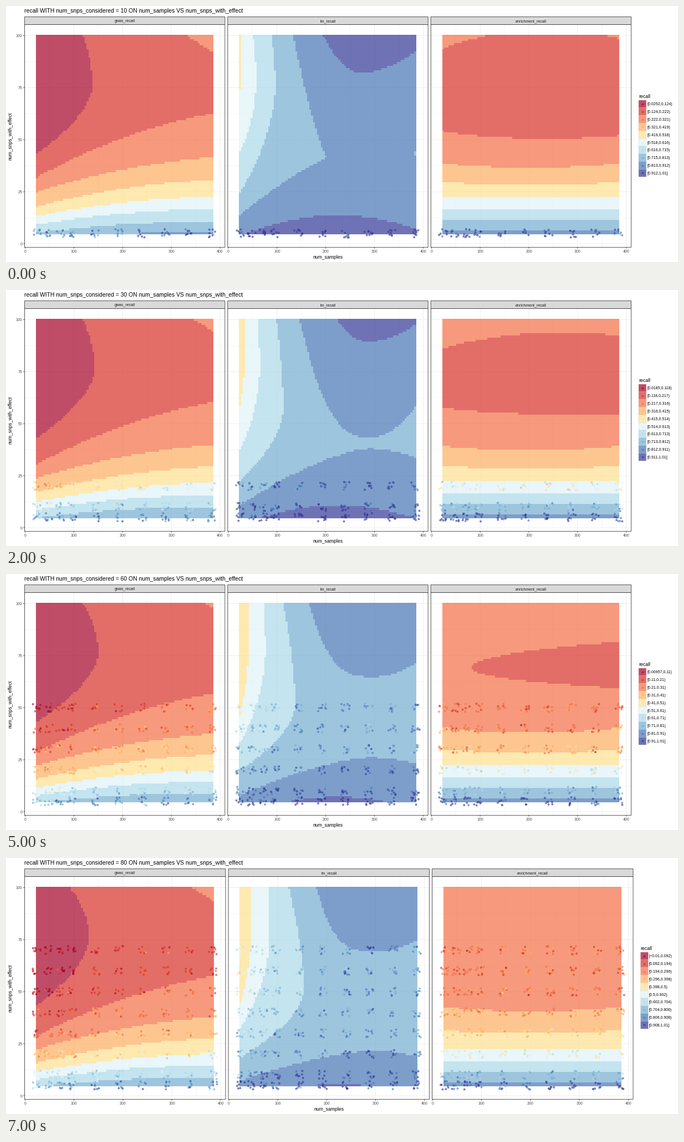
Write a matplotlib script that moves like this. It is 1212 px wide and 462 px high and loops after 8000 ms.

```python
import numpy as np
import matplotlib.pyplot as plt
from matplotlib.animation import FuncAnimation
from matplotlib.colors import to_rgb
from matplotlib.patches import Rectangle

W, H = 1212, 462
plt.rcParams["font.family"] = "Liberation Sans"

PALETTE = np.array([to_rgb(c) for c in (
    "#a50026", "#d73027", "#f46d43", "#fdae61", "#fee090",
    "#e0f3f8", "#abd9e9", "#74add1", "#4575b4", "#313695")])
PANELS = ("gwas_recall", "lm_recall", "enrichment_recall")
POINT_SHIFT = (0.2, 0.6, -0.2)
LOWEST = (0.0252, 0.0219, 0.0185, 0.0154, 0.0124, 0.00957, 0.00684, -0.01)
RIGHT_EDGE = {70: 1123.5, 80: 1131}
LEFT, TOP, BOTTOM, GAP = 33.5, 33.5, 435.5, 5
BASE, SMALL, TITLE = 8.67, 6.95, 10.4
INK, GREY, EDGE = "#000000", "#4d4d4d", "#333333"

GROUPS = [24, 48, 72] + list(range(96, 385, 48))
REPEATS = 8

# Tile centres, and the sample axis scaled to 0..1.
X, Y = np.meshgrid(np.arange(24, 385, 4), np.arange(5, 101))
S = (X - 24) / 360
HUMP = 4 * S * (1 - S)


def lobe(v, start, top, end, p, q=2):
    """Curve through three (position, value) points that is flat at the middle one."""
    d = v - top[0]
    before = d < 0
    reach = np.where(before, d / (start[0] - top[0]), d / (end[0] - top[0]))
    goal = np.where(before, start[1], end[1])
    return top[1] + (goal - top[1]) * reach ** np.where(before, p, q)


def gwas_field(num):
    t, late = min((num - 10) / 60, 1), max((num - 70) / 10, 0)
    field = np.full(X.shape, 1)

    width = 138 + 14 * t - 21 * late
    field[X < lobe(Y, (43, 22), (76, width), (101, 117 - 28 * late), 1.7)] = 0

    corner = 329 + 45 * t - 36 * late
    drop = 8.5 - 7.2 * t + 5.5 * late
    field[Y > 100.5 - drop * (X - corner) / (386 - corner)] = 2

    left = (32, 25, 18, 13.2, 9.2, 5.2, 2)
    right = (62.7, 41.5, 30.6, 22.5, 16.5, 10.5, 5.4)
    bends = np.linspace(0.5, 1.2, 7)
    for level, (a, b, bend) in enumerate(zip(left, right, bends), 2):
        height = a + (b - a) * (S + bend * S * (1 - S))
        field[Y < height * (1 - 0.1 * t + 0.03 * late) - 0.8 * t] = level
    return field


def lm_field(num):
    t = (num - 10) / 70
    rest = 1 - t
    field = np.full(X.shape, 7)

    low = 69.5 - 49.5 * rest**1.9
    upper = lobe(X, (133 + 45 * t, 101), (288 + 15 * t, low),
                 (390, 75.5 - 27.5 * rest**1.75), 2.3 + 1.2 * t)
    crest = 21.5 + 26.5 * rest**1.4
    lower = lobe(X, (20, 7 + 6 * rest**2), (290, crest), (390, 0.87 * crest), 1.5)
    field[(Y > upper) | (Y < lower)] = 8

    mid, low = 272 + 40 * t, 82.5 + 25 * t
    field[Y > lobe(X, (mid - 100, low + 30), (mid, low), (mid + 100, low + 8), 2)] = 9
    crest = 5.5 + 8.1 * rest**1.25
    field[Y < lobe(X, (45, crest - 8), (225, crest), (385, crest - 6.5), 2)] = 9

    field[X < lobe(Y, (23.7 - 5.5 * t, 22), (52 + 25 * rest**4, 97 + 57 * t),
                   (101, 89 + 33 * t), 1.85, 1.6)] = 6
    field[X < lobe(Y, (32 + 11 * rest**3, 22), (78, 57 + 27 * t),
                   (101, 51 + 30 * t), 2)] = 5
    peak = 26 + 22 * t**0.7
    field[X < lobe(Y, (43 + 25 * rest**2, 22), (101, peak), (102, peak), 3)] = 4
    return field


def enrichment_field(num):
    t, late = min((num - 10) / 60, 1), max((num - 70) / 10, 0)
    field = np.full(X.shape, 2)

    # The red lens shrinks to the right and vanishes.
    centre = 74 - 6 * t + 1.5 * S + 2 * (1 - t) * HUMP
    reach = (400 - 620 * t + 130 * t**2 - 100 * late
             + 150 * S + 200 * (1 - t)**2 * HUMP)
    field[(Y - centre)**2 < reach] = 1

    heights = (38.6 + 2 * t + 2 * late - 2 * HUMP,
               29.4 + 0.2 * t + 1.7 * late - HUMP, 22.4, 16.4, 11.4, 6.4)
    for level, height in enumerate(heights, 3):
        field[Y < height] = level
    return field


FIELDS = (gwas_field, lm_field, enrichment_field)


def y_px(v):
    return 429 - 3.755 * v


def text(x, y, s, size=SMALL, color=INK, **kw):
    ax.text(x, y, s, fontsize=size, color=color, va="baseline", **kw)


def line(xs, ys, color, width, z):
    ax.plot(xs, ys, color=color, lw=width, zorder=z,
            solid_capstyle="butt", snap=False)


def box(x, y, w, h, face, edge, width, z):
    ax.add_patch(Rectangle((x, y), w, h, fc=face, ec=edge, lw=width,
                           zorder=z, snap=False))


def dots(x, y, levels):
    rgb = PALETTE[levels]
    n = len(rgb)
    ax.scatter(x, y, s=8, lw=0.85, zorder=4,
               facecolors=np.column_stack([rgb, np.full(n, 0.4)]),
               edgecolors=np.column_stack([rgb, np.full(n, 0.8)]))


def draw_points(num, field, shift, x_px, rng):
    xs, ys, levels = [], [], []
    for row in [5] + list(range(10, num, 10)):
        for group in GROUPS:
            level = field[row - 5, (group - 24) // 4] + (0.8 if row == 5 else shift)
            xs += list(group + rng.uniform(-8.5, 8.5, REPEATS))
            ys += list(row + rng.uniform(-2, 2, REPEATS))
            levels += list(rng.normal(level, 0.65, REPEATS))
    levels = np.clip(np.rint(levels), 0, 9).astype(int)
    dots(x_px(np.array(xs)), y_px(np.array(ys)), levels)


def draw_panel(num, k, left, width, rng):
    def x_px(v):
        return left + (v + 1.2) * width / 411.1

    right = left + width
    for v in range(0, 401, 50):
        line([x_px(v)] * 2, [TOP, BOTTOM], "#ebebeb", 0.4 if v % 100 else 0.8, 1)
    for v in np.arange(0, 101, 12.5):
        line([left, right], [y_px(v)] * 2, "#ebebeb", 0.4 if v % 25 else 0.8, 1)

    field = FIELDS[k](num)
    rgba = np.dstack([PALETTE[field], np.full(field.shape, 0.7)])
    extent = np.rint([x_px(22), x_px(386), y_px(4.5), y_px(100.5)])
    ax.imshow(rgba, origin="lower", aspect="auto", interpolation="nearest",
              extent=extent, zorder=2)
    draw_points(num, field, POINT_SHIFT[k], x_px, rng)

    box(left, TOP, width, BOTTOM - TOP, "none", EDGE, 0.8, 5)
    box(left, 19.5, width, TOP - 19.5, "#d9d9d9", EDGE, 0.8, 5)
    text(left + width / 2, 29.2, PANELS[k], color="#1a1a1a", ha="center", zorder=6)
    for v in range(0, 401, 100):
        line([x_px(v)] * 2, [BOTTOM, BOTTOM + 2.5], EDGE, 0.8, 5)
        text(x_px(v), 445.3, str(v), color=GREY, ha="center")


def draw_legend(left, low):
    text(left, 166.5, "recall", BASE)
    cuts = [f"{v:.3g}".replace("-", "\u2212") for v in np.linspace(low, 1.01, 11)]
    side = 13.83
    for i in range(10):
        top = 170 + i * side
        box(left, top, side, side, (*PALETTE[i], 0.7), "#cccccc", 0.3, 3)
        dots([left + side / 2], [top + side / 2], [i])
        end = "]" if i == 9 else ")"
        text(left + 15.5, top + side / 2 + 2.5, f"[{cuts[i]},{cuts[i + 1]}{end}")


def draw(step):
    num = 10 * (step + 1)
    rng = np.random.default_rng(num)
    ax.clear()
    ax.axis("off")

    edge = RIGHT_EDGE.get(num, 1127.5)
    width = (edge - LEFT - 2 * GAP) / 3
    for k in range(3):
        draw_panel(num, k, LEFT + k * (width + GAP), width, rng)

    for v in range(0, 101, 25):
        line([LEFT - 2.5, LEFT], [y_px(v)] * 2, EDGE, 0.8, 5)
        text(29.5, y_px(v) + 2.5, str(v), color=GREY, ha="right")
    text(33, 12, f"recall WITH num_snps_considered = {num} "
                 "ON num_samples VS num_snps_with_effect", TITLE)
    text((LEFT + edge) / 2, 455.5, "num_samples", BASE, ha="center")
    text(10.5, 235, "num_snps_with_effect", BASE, ha="center",
         rotation=90, rotation_mode="anchor")
    draw_legend(edge + 13.5, LOWEST[step])

    ax.set_xlim(0, W)
    ax.set_ylim(H, 0)


fig = plt.figure(figsize=(W / 72, H / 72), dpi=72, facecolor="white")
ax = fig.add_axes([0, 0, 1, 1])
anim = FuncAnimation(fig, draw, frames=8, interval=1000, init_func=lambda: None,
                     repeat=True, repeat_delay=0, blit=False)
plt.show()
```
